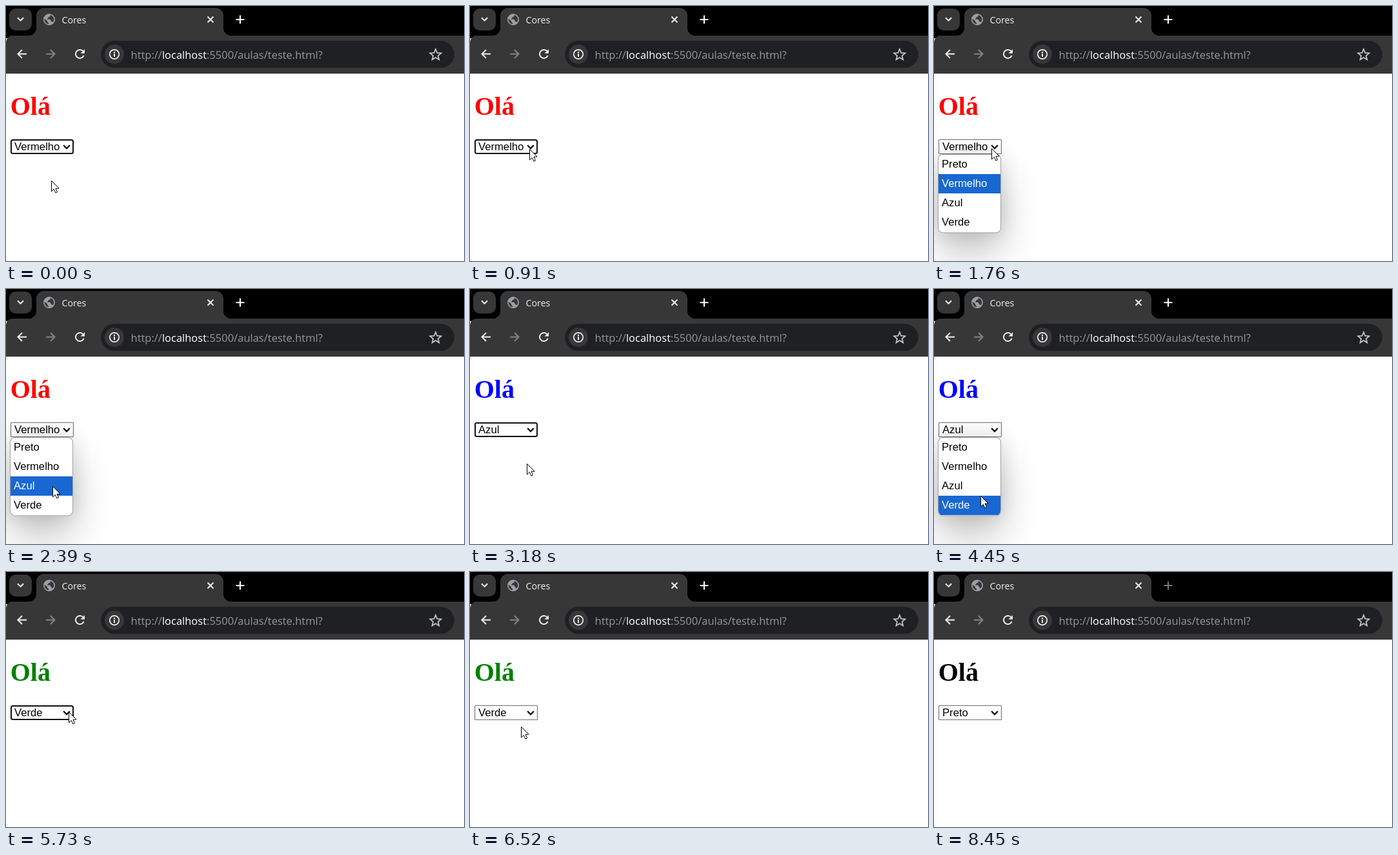
These frames come from a looping animation (710 px wide and 396 px high, 8510 ms). An HTML page with a canvas:

```html
<!DOCTYPE html>
<html lang="pt-BR">
<head>
<meta charset="utf-8">
<title>Cores</title>
<style>
html, body { margin: 0; width: 100%; height: 100%; overflow: hidden; background: #fff; }
canvas { display: block; }
</style>
</head>
<body>
<canvas id="stage" width="710" height="396"></canvas>
<script>
const ctx = document.getElementById('stage').getContext('2d');
const LOOP = 8510;
const BAR = '#373737';
const UI = '"Open Sans", "Noto Sans", sans-serif';
const ARIAL = '16.67px "Liberation Sans", Arial, sans-serif';
const SERIF = 'bold 40px "Liberation Serif", "Times New Roman", serif';

const OPTIONS = ['Preto', 'Vermelho', 'Azul', 'Verde'];
const COLORS = ['#000', '#f00', '#00f', '#008000'];

// [time, selected option]
const PICKS = [[0, 1], [2670, 2], [4730, 3], [6550, 0]];
// [menu opens, menu closes]
const MENUS = [[1400, 2640], [3900, 4700], [5900, 6500]];
const BLUR_AT = 8200;

// [time, x, y] of the pointer tip
const PATH = [
  [0, 70, 271], [300, 70, 271], [900, 92, 222], [1400, 90, 221], [1770, 89, 221],
  [2250, 73, 303], [2450, 72, 307], [2840, 72, 307], [3140, 88, 271], [3280, 88, 271],
  [3700, 95, 222], [4000, 95, 222], [4380, 72, 321], [4780, 72, 321],
  [5150, 84, 275], [5650, 97, 217], [6000, 97, 217], [6320, 79, 240], [6720, 79, 240],
  [7200, 69, 272], [7450, 62, 282], [7560, 62, 282], [7900, -15, 280]
];

function pointer(t) {
  const i = PATH.findIndex(p => p[0] > t);
  if (i < 0) return PATH[PATH.length - 1].slice(1);
  const [t0, x0, y0] = PATH[i - 1], [t1, x1, y1] = PATH[i];
  const u = (t - t0) / (t1 - t0), e = u * u * (3 - 2 * u);
  return [Math.round(x0 + (x1 - x0) * e), Math.round(y0 + (y1 - y0) * e)];
}

function box(x, y, w, h, r, fill) {
  ctx.beginPath();
  ctx.roundRect(x, y, w, h, r);
  ctx.fillStyle = fill;
  ctx.fill();
}

function disc(x, y, r, fill) {
  ctx.beginPath();
  ctx.arc(x, y, r, 0, 7);
  ctx.fillStyle = fill;
  ctx.fill();
}

function poly(points, close) {
  ctx.beginPath();
  points.forEach(([x, y]) => ctx.lineTo(x, y));
  if (close) ctx.closePath();
}

function line(points, color, width, close) {
  poly(points, close);
  ctx.strokeStyle = color;
  ctx.lineWidth = width;
  ctx.stroke();
}

function blob(points, fill) {
  poly(points, true);
  ctx.fillStyle = fill;
  ctx.fill();
}

function text(s, x, y, font, color) {
  ctx.font = font;
  ctx.fillStyle = color;
  ctx.fillText(s, x, y);
}

function chevron(x, y, w, h, color, width) {
  line([[x - w, y - h], [x, y + h], [x + w, y - h]], color, width);
}

function arrow(x, y, dir, color) {
  line([[x - 7 * dir, y], [x + 7 * dir, y]], color, 2);
  line([[x, y - 6.5], [x + 6.5 * dir, y], [x, y + 6.5]], color, 2);
}

function globe(x, y) {
  disc(x, y, 9, '#9aa0a6');
  ctx.save();
  ctx.beginPath();
  ctx.arc(x, y, 7.3, 0, 7);
  ctx.clip();
  blob([[x + 1, y - 8], [x + 2, y - 5], [x - 1, y - 4], [x - 2, y - 2], [x - 4, y - 1],
    [x + 2, y], [x + 3, y + 3], [x + 6, y + 4], [x + 9, y], [x + 7, y - 6]], BAR);
  blob([[x - 8, y - 2], [x - 3, y + 2], [x - 3, y + 4], [x - 1, y + 5], [x - 1, y + 9], [x - 8, y + 6]], BAR);
  ctx.restore();
}

function tabs(active) {
  ctx.fillStyle = '#000';
  ctx.fillRect(0, 0, 710, 50);
  box(5, 4, 35, 34, 10, BAR);
  chevron(22.5, 20.5, 4.5, 2.2, '#fff', 2);

  // tab with flared feet
  ctx.beginPath();
  ctx.moveTo(35, 46);
  ctx.arcTo(47, 46, 47, 34, 12);
  ctx.arcTo(47, 3, 59, 3, 12);
  ctx.arcTo(337, 3, 337, 15, 12);
  ctx.arcTo(337, 46, 349, 46, 12);
  ctx.lineTo(349, 47);
  ctx.lineTo(35, 47);
  ctx.fillStyle = BAR;
  ctx.fill();

  globe(67, 21);
  text('Cores', 86.5, 27, '14.2px ' + UI, '#f1f1f1');
  line([[312.5, 16.5], [321.5, 25.5]], '#f1f1f1', 2);
  line([[321.5, 16.5], [312.5, 25.5]], '#f1f1f1', 2);
  const plus = active ? '#fff' : '#777';
  line([[356.5, 21], [369.5, 21]], plus, 2);
  line([[363, 14.5], [363, 27.5]], plus, 2);
}

function toolbar() {
  box(0, 46, 710, 59, [10, 0, 0, 0], BAR);
  arrow(25, 74.5, -1, '#f1f1f1');
  arrow(69, 74.5, 1, '#858585');

  ctx.beginPath();
  ctx.arc(114.5, 74.5, 6.5, 0.35, 5.5);
  ctx.strokeStyle = '#f1f1f1';
  ctx.lineWidth = 2;
  ctx.stroke();
  blob([[122, 67], [122, 73.5], [115.5, 73.5]], '#f1f1f1');

  box(147, 54, 548, 42, 21, '#1f2024');
  disc(168, 75, 15, '#383838');
  ctx.beginPath();
  ctx.arc(168, 75, 7.2, 0, 7);
  ctx.strokeStyle = '#f1f1f1';
  ctx.lineWidth = 1.7;
  ctx.stroke();
  ctx.fillStyle = '#f1f1f1';
  ctx.fillRect(167, 74, 2, 5);
  ctx.fillRect(167, 71, 2, 2);

  const font = '16.5px ' + UI;
  let x = 193.5;
  for (const [s, color] of [['http://', '#96979a'], ['localhost', '#fff'], [':5500/aulas/teste.html?', '#96979a']]) {
    text(s, x, 81.5, font, color);
    x += ctx.measureText(s).width;
  }

  const star = [];
  for (let i = 0; i < 10; i++) {
    const r = i % 2 ? 4 : 9, a = i * Math.PI / 5 - Math.PI / 2;
    star.push([666 + r * Math.cos(a), 76 + r * Math.sin(a)]);
  }
  line(star, '#c4c4c4', 1.8, true);
}

function field(pick, focused) {
  if (focused) {
    box(7, 207, 98, 23, 3.5, '#101010');
    box(9, 209, 94, 19, 1.5, '#fff');
  } else {
    box(7, 207, 98, 23, 1.5, '#6f6f6f');
    box(8.1, 208.1, 95.8, 20.8, 0.5, '#fff');
  }
  text(OPTIONS[pick], 13, 224, ARIAL, '#000');
  chevron(94, 218.7, 4.8, 2.5, '#000', 2.3);
}

function shade(dy, blur, alpha) {
  ctx.save();
  ctx.shadowColor = `rgba(0,0,0,${alpha})`;
  ctx.shadowBlur = blur;
  ctx.shadowOffsetY = dy;
  // keep the shadow outside the popup
  ctx.beginPath();
  ctx.rect(0, 0, 710, 396);
  ctx.roundRect(6, 230, 98, 122, 8);
  ctx.clip('evenodd');
  box(6, 230, 98, 122, 8, '#fff');
  ctx.restore();
}

function menu(hot) {
  shade(30, 60, 0.24);
  shade(0, 30, 0.12);
  box(6, 230, 98, 122.5, 8, '#a2a2a2');
  box(7, 231, 96, 120.5, 7, '#fff');
  ctx.save();
  ctx.beginPath();
  ctx.roundRect(7, 231, 96, 120.5, 7);
  ctx.clip();
  OPTIONS.forEach((name, i) => {
    const y = 231 + i * 30;
    if (i === hot) {
      ctx.fillStyle = '#1967d2';
      ctx.fillRect(7, y, 96, 30);
    }
    text(name, 12, y + 20, ARIAL, i === hot ? '#fff' : '#000');
  });
  ctx.restore();
}

function cursor(x, y) {
  const shape = [[0, 0], [0, 16.5], [3.8, 13], [6.4, 18.6], [9, 17.4], [6.5, 11.9], [11.6, 11.6]]
    .map(([dx, dy]) => [x + 0.5 + dx, y + 0.5 + dy]);
  blob(shape, '#fff');
  line(shape, '#000', 1, true);
}

function draw(t) {
  const [x, y] = pointer(t);
  const pick = PICKS.filter(p => p[0] <= t).pop()[1];
  const open = MENUS.some(([a, b]) => t >= a && t < b);
  const settling = MENUS.some(([, b]) => t >= b && t < b + 40);
  const active = t < BLUR_AT;

  ctx.fillStyle = '#fff';
  ctx.fillRect(0, 0, 710, 396);
  tabs(active);
  toolbar();
  text('Olá', 6.7, 169, SERIF, COLORS[pick]);
  field(pick, active && !open && !settling);
  if (open) menu(y < 231 ? pick : Math.min(3, Math.floor((y - 231) / 30)));
  cursor(x, y);
}

function tick() {
  draw(performance.now() % LOOP);
  requestAnimationFrame(tick);
}
tick();
</script>
</body>
</html>
```
